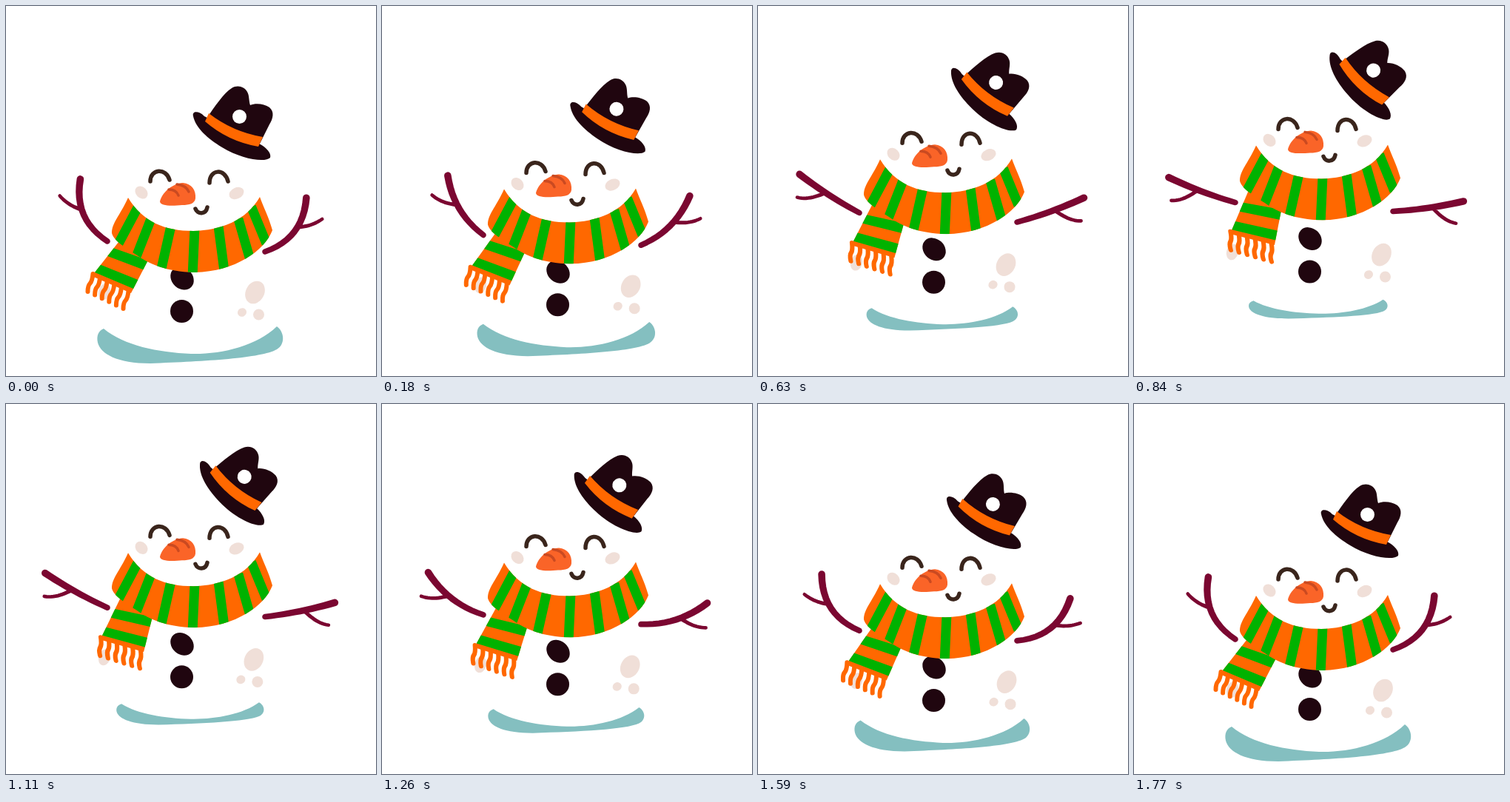
An HTML page that plays this animation: 500x500 px, repeating every 1800 ms.

```html
<!DOCTYPE html>
<html lang="en">
<head>
<meta charset="utf-8">
<title>Snowman</title>
<style>
html, body { margin: 0; width: 100%; height: 100%; overflow: hidden; background: #fff; }
svg { display: block; width: 100%; height: 100%; }
.ink { fill: #20060f; }
.pale { fill: #f0dfd8; }
.orange { fill: #ff6800; }
.green { fill: #00b200; }
.line { fill: none; stroke: #3a251c; stroke-width: 5.5; stroke-linecap: round; stroke-linejoin: round; }
.fringe { fill: none; stroke: #ff6800; stroke-width: 6; stroke-linecap: round; }
.arm { fill: #7b0731; stroke: #7b0731; stroke-width: 2; stroke-linejoin: round; }
</style>
</head>
<body>
<svg viewBox="0 0 500 500">
  <defs>
    <clipPath id="wrap"><path d="M165 259C185 292 215 304 253 304C290 303 325 290 343 258C348 272 355 285 360 303C350 330 310 359 255 360C215 359 195 348 183 341C165 328 147 320 143 307C143 293 153 285 165 259Z"/></clipPath>
  </defs>
  <path id="shadow" fill="#84bfc0" d="M132 436C160 459 205 468 250 470C290 471 338 460 366 433C376 440 378 457 366 464C345 476 270 480 195 483C150 483 128 470 124 455C122 445 125 439 132 436Z"/>
  <g id="body">
    <ellipse class="pale" cx="133" cy="386" rx="8" ry="11" transform="rotate(15 133 386)"/>
    <g class="ink">
      <ellipse cx="238" cy="368" rx="17" ry="14" transform="rotate(42 238 368)"/>
      <ellipse cx="237.500" cy="412.500" rx="15.500" ry="15.500"/>
    </g>
  </g>
  <g id="spots" class="pale">
    <ellipse cx="336.500" cy="387" rx="12.500" ry="16" transform="rotate(28 336.5 387)"/>
    <ellipse cx="341.500" cy="417" rx="7.500" ry="7.500"/>
    <ellipse cx="319" cy="414" rx="6.200" ry="5.700" transform="rotate(-30 319 414)"/>
  </g>
  <path id="leftArm" class="arm"/>
  <path id="rightArm" class="arm"/>
  <g id="head">
    <g id="tail"></g>
    <g clip-path="url(#wrap)">
      <path class="orange" d="M130 250H370V370H130Z"/>
      <path id="stripes" stroke="#00b200" stroke-width="13"/>
    </g>
    <ellipse class="pale" cx="183" cy="252" rx="9.500" ry="7.500" transform="rotate(45 183 252)"/>
    <ellipse class="pale" cx="311.500" cy="253" rx="10.500" ry="7.500" transform="rotate(-25 311.5 253)"/>
    <path class="line" d="M195 237C195 220 216 218 221 235M275 239C275 220 296 219 300 237"/>
    <path class="line" d="M256 274C259 282 270 282 272 272"/>
    <path fill="#fa6428" d="M208 264C212 250 226 240 239 239C251 240 257 249 256 260C255 267 248 269 238 269C226 270 208 271 208 264Z"/>
    <path fill="none" stroke="#ca4a21" stroke-width="3.500" stroke-linecap="round" d="M220 248Q230 248 233 256M231 241Q243 242 247 251"/>
    <g id="hat">
      <path class="ink" d="M253 149C251 142 260 141 268 149L342 186C352 191 359 199 357 205C350 212 318 207 292 191C272 179 256 164 253 149Z"/>
      <path class="ink" d="M271 152C282 136 294 118 305 111C313 106 322 109 326 116C329 121 328 128 330 134C337 131 349 132 356 137C363 143 361 152 356 160L342 188Z"/>
      <path class="orange" d="M274 145Q306 170 347 177L341 190Q300 183 269 156Z"/>
      <circle cx="315.500" cy="149.500" r="9.500" fill="#fff"/>
    </g>
  </g>
</svg>
<script>
const LOOP = 1800, STEP = 30;
const REST = 52, TOP = 900, LANDED = 1770;
const $ = id => document.getElementById(id);
const mix = (a, b, k) => a + (b - a) * k;
const clamp = v => Math.min(1, Math.max(0, v));
const move = (id, transform) => $(id).setAttribute("transform", transform);

// Stripes fan out symmetrically around the middle of the scarf
function fanStripes() {
  let d = "";
  for (let i = -3; i <= 3; i++) {
    const topX = 255 + 82 * Math.sin(.4 * i), topY = 300 - 3.2 * i * i;
    const endX = 252 + 104 * Math.sin(.43 * i), endY = 366 - 5 * i * i;
    d += `M${topX} ${topY}L${endX} ${endY}`;
  }
  return d;
}

function hangingEnd() {
  const left = k => [mix(156, 116, k), mix(314, 365, k)];
  const right = k => [mix(200, 169, k), mix(328, 388, k)];
  const band = (from, to, name) =>
    `<path class="${name}" d="M${left(from)}L${right(from)}L${right(to)}L${left(to)}Z"/>`;
  let fringe = "";
  for (let i = 0; i < 6; i++) {
    const x = mix(117.5, 165.5, i / 5), y = mix(362, 385, i / 5);
    fringe += `M${x} ${y}q-1 10 -4 13t-3 11`;
  }
  return `<path class="fringe" d="${fringe}"/>` +
    band(-.2, 1, "orange") + band(.26, .47, "green") + band(.7, .9, "green");
}

// Tapered outline along a cubic, with round ends
function limb([x0, y0, x1, y1, x2, y2, x3, y3], r0, r1) {
  const near = [], far = [];
  for (let i = 0; i <= 12; i++) {
    const u = i / 12, v = 1 - u, r = mix(r0, r1, u);
    const at = (a, b, c, d) => v * v * v * a + 3 * v * v * u * b + 3 * v * u * u * c + u * u * u * d;
    const slope = (a, b, c, d) => v * v * (b - a) + 2 * v * u * (c - b) + u * u * (d - c);
    const dx = slope(x0, x1, x2, x3), dy = slope(y0, y1, y2, y3), len = Math.hypot(dx, dy);
    const x = at(x0, x1, x2, x3), y = at(y0, y1, y2, y3);
    const nx = -dy / len * r, ny = dx / len * r;
    near.push(`${x + nx} ${y + ny}`);
    far.unshift(`${x - nx} ${y - ny}`);
  }
  return `M${near.join("L")}A${r1} ${r1} 0 0 0 ${far[0]}L${far.join("L")}A${r0} ${r0} 0 0 0 ${near[0]}Z`;
}

// Arm lying along the x axis, sagging by bend, with a twig below
function arm(bend) {
  const length = 97 - .35 * bend, sag = bend * 4 / 3;
  const twigY = 27 + bend / 2;
  return limb([0, 0, length / 3, sag, length * 2 / 3, sag, length, 0], 2.8, 3.8) +
    limb([53, bend, 62, mix(bend, twigY, .5), 70, twigY - 4, 82, twigY], 1.6, 1.3);
}

function draw(t) {
  const falling = t > TOP;
  const rise = clamp(falling ? (LANDED - t) / (LANDED - TOP) : (t - REST) / (TOP - REST));
  const lift = 76 * rise, k = lift / 70;

  move("head", `translate(0 ${-lift})`);
  move("hat", `translate(0 ${3.5 * k}) rotate(${18.2 * k} 305 177)`);
  move("tail", `matrix(1 ${-.15 * k} ${.305 * k} 1 ${-97.6 * k} ${30.9 * k})`);
  move("body", `translate(0 ${-53 * k})`);
  move("spots", `translate(${-2 * k} ${-50.5 * k})`);
  move("shadow", `translate(249 ${435 - 37 * k}) scale(${1 - .25 * k} ${1 - .48 * k}) translate(-249 -435)`);

  // Arms straighten early on the way up and bend late on the way down
  const flex = clamp(falling ? (.82 - k) / .37 : (.39 - k) / .39);
  const droop = falling ? 7 * Math.sin(Math.PI * rise) : 0;
  const shape = arm(mix(2, 15, flex));
  $("leftArm").setAttribute("d", shape);
  $("rightArm").setAttribute("d", shape);
  move("leftArm", `translate(137 ${318 - 52 * k}) scale(-1 1) rotate(${45.5 * k - 66.5})`);
  move("rightArm", `translate(350 ${332 - 54 * k}) rotate(${44 * k - 52.5 + droop})`);
}

$("stripes").setAttribute("d", fanStripes());
$("tail").innerHTML = hangingEnd();

const start = performance.now();
function tick() {
  const t = (performance.now() - start) % LOOP;
  draw(Math.floor(t / STEP) * STEP);
  requestAnimationFrame(tick);
}
tick();
</script>
</body>
</html>
```
